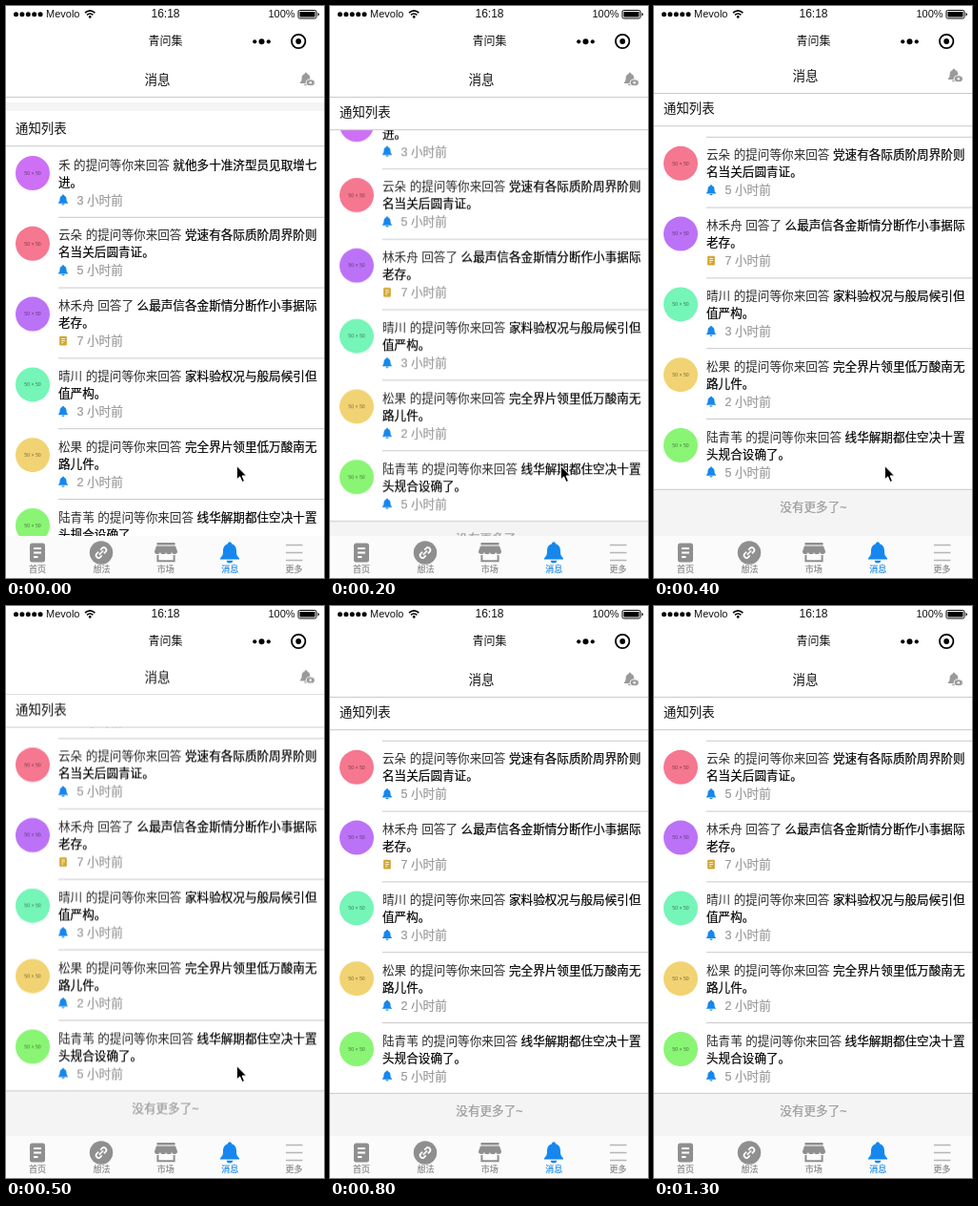
An HTML page for the animation above (1400 ms loop, 334 px wide and 599 px high).

```html
<!DOCTYPE html>
<html lang="zh-CN">
<head>
<meta charset="utf-8">
<title>消息</title>
<style>
  html, body { margin: 0; width: 100%; height: 100%; overflow: hidden; background: #fff; }
  svg { display: block; width: 334px; height: 599px; }
  text { font: 12.6px "Liberation Sans", "Noto Sans CJK SC", "Noto Sans CJK", sans-serif; fill: #111; }
  .mid { text-anchor: middle; }
  .lead { fill: #2b2b2b; }
  .strong { font-weight: 500; fill: #000; stroke: #000; stroke-width: .2px; }
  .time, .end { fill: #999; stroke: #999; stroke-width: .2px; }
  .size { font-size: 5.2px; fill: #000; fill-opacity: .5; }
  .status { font-size: 11px; }
  .tab { font-size: 9px; fill: #858585; stroke: #858585; stroke-width: .15px; }
  .tab.on { fill: #1687ee; stroke: #1687ee; }
  .rule { stroke: #c9c9c9; }

  /* One keyframe step every 100 ms */
  #page, #list, #heading, #pointer { animation: 1400ms step-end infinite; }
  #page { animation-name: bounce; }
  #list { animation-name: scroll; }
  #heading { animation-name: stick; }
  #pointer { animation-name: vanish; }
  @keyframes scroll {
    0% { transform: translateY(0); }
    7.1428% { transform: translateY(-29.3px); }
    14.2857% { transform: translateY(-50.8px); }
    21.4285%, 100% { transform: translateY(-80px); }
  }
  @keyframes bounce {
    0% { transform: translateY(0); }
    21.4285% { transform: translateY(-1px); }
    28.5714% { transform: translateY(-4px); }
    35.7142% { transform: translateY(-2.6px); }
    42.8571%, 100% { transform: translateY(0); }
  }
  @keyframes stick {
    0% { transform: translateY(17px); }
    7.1428%, 100% { transform: translateY(0); }
  }
  @keyframes vanish {
    0% { visibility: visible; }
    50%, 100% { visibility: hidden; }
  }
</style>
</head>
<body>
<svg viewBox="0 0 334 599">
  <defs>
    <path id="bell" d="M0-11c1.3 0 2 .9 2 2 3.6 1 5 4 5 7.5 0 4 .8 5.5 3 7.5v1.3H-10V6c2.2-2 3-3.5 3-7.5 0-3.5 1.4-6.5 5-7.5 0-1.1.7-2 2-2zM-3.2 8.4h6.4a3.2 2.6 0 0 1-6.4 0z"/>
    <g id="note">
      <rect x="-8" y="-10" width="16" height="20" rx="2.5"/>
      <path d="M-4-4.5h8M-4 0h8M-4 4.5h4.5" stroke="#fff" stroke-width="1.8"/>
    </g>
  </defs>
  <rect width="334" height="599" fill="#fff"/>

  <g id="page">
    <g id="list"></g>
    <g id="heading">
      <rect y="84" width="334" height="46" fill="#fff"/>
      <rect y="84" width="334" height="9" fill="#f4f4f4"/>
      <text x="10" y="116" style="font-size:13.4px">通知列表</text>
      <path class="rule" d="M0 129.7h334"/>
    </g>
    <rect width="334" height="95" fill="#fff"/>
    <path class="rule" d="M0 95.5h334"/>
    <text class="mid" x="159" y="81.8" style="font-size:13.5px">消息</text>
    <g fill="#9a9a9a">
      <use href="#bell" transform="translate(315 76.5) scale(.62)"/>
      <ellipse cx="319.8" cy="80.3" rx="4.6" ry="3.5" stroke="#fff"/>
      <circle cx="319.8" cy="80.3" r="1.3" fill="#fff"/>
    </g>
  </g>

  <g id="bar">
    <rect width="334" height="58" fill="#fff"/>
    <g id="signal"></g>
    <text class="status" x="42" y="12">Mevolo</text>
    <g fill="none" stroke="#000" stroke-width="1.6">
      <path d="M83 7.2q5.2-4.6 10.4 0M85 9.4q3.2-2.8 6.4 0"/>
      <circle cx="88.2" cy="11.4" r=".6"/>
    </g>
    <text class="mid" x="167.5" y="12.2" style="font-size:12px">16:18</text>
    <text class="status" x="275.5" y="12" textLength="">100%</text>
    <rect x="307" y="4.5" width="19" height="8.5" rx="1.5" fill="none" stroke="#000"/>
    <rect x="308.5" y="6" width="16" height="5.5" rx=".5"/>
    <path d="M327.5 7v3.5q1.5-.4 1.5-1.75T327.5 7z"/>
    <text class="mid" x="167.5" y="40.8" style="font-size:12px;font-weight:500">青问集</text>
    <circle cx="261.2" cy="37.3" r="2.1"/>
    <circle cx="268.5" cy="37.3" r="3"/>
    <circle cx="275.8" cy="37.3" r="2.1"/>
    <circle cx="307.2" cy="37" r="7.2" fill="none" stroke="#000" stroke-width="1.8"/>
    <circle cx="307.2" cy="37" r="2.9"/>
  </g>

  <g id="tabs" fill="#8f8f8f">
    <rect y="555" width="334" height="44" fill="#fbfbfb"/>
    <use href="#note" x="33" y="572.5"/>
    <circle cx="100" cy="572.5" r="12.2"/>
    <g transform="translate(100 572.5) rotate(-45)" fill="none" stroke="#fff" stroke-width="1.7">
      <path d="M-1.5-2.6h-2.4a2.6 2.6 0 0 0 0 5.2h2.4M1.5-2.6h2.4a2.6 2.6 0 0 1 0 5.2H1.5M-3 0h6"/>
    </g>
    <g transform="translate(168 572)">
      <path d="M-9.5-10h19v2.4h-19zM-10-6.4h20l2 5.4a3 2.7 0 0 1-6 .4 3 2.7 0 0 1-6 0 3 2.7 0 0 1-6 0 3 2.7 0 0 1-6-.4z"/>
      <path d="M-8.6 3V9.2H8.6V3" fill="none" stroke="#8f8f8f" stroke-width="2"/>
    </g>
    <use href="#bell" x="235" y="572.3" fill="#1687ee"/>
    <path d="M294 564.5h17.5M294 572.5h17.5M294 580.5h17.5" stroke="#b5b5b5" stroke-width="1.6"/>
  </g>

  <path id="pointer" d="M242.3 481.5v14.4l3.3-3 2.4 5.6 2.5-1.1-2.4-5.4h4.5z" stroke="#fff" stroke-width="1"/>
</svg>

<script>
  const LIST_TOP = 147.5, PITCH = 73.8;
  const ASK = '的提问等你来回答', REPLY = '回答了';
  const rows = [
    ['#cd70f5', '禾', ASK, '就他多十准济型员见取增七', '进。', 3],
    ['#f67790', '云朵', ASK, '党速有各际质阶周界阶则', '名当关后圆青证。', 5],
    ['#bc72f7', '林禾舟', REPLY, '么最声信各金斯情分断作小事据际', '老存。', 7],
    ['#75f5b7', '晴川', ASK, '家料验权况与般局候引但', '值严构。', 3],
    ['#f2d373', '松果', ASK, '完全界片领里低万酸南无', '路儿件。', 2],
    ['#8af574', '陆青苇', ASK, '线华解期都住空决十置', '头规合设确了。', 5],
  ];

  const icon = (action) => action === REPLY
    ? '<use href="#note" transform="translate(60 55.5) scale(.48)" fill="#d3a62f"/>'
    : '<use href="#bell" transform="translate(60 55.5) scale(.5)" fill="#1687ee"/>';

  const rowMarkup = ([color, name, action, first, second, hours], i) => `
    <g transform="translate(0 ${LIST_TOP + i * PITCH})">
      <circle cx="28" cy="27.5" r="18" fill="${color}"/>
      <text class="size mid" x="28" y="29.4">50 × 50</text>
      <text class="lead" x="55" y="23.2">${name} ${action} <tspan class="strong">${first}</tspan></text>
      <text class="strong" x="55" y="41.2">${second}</text>
      ${icon(action)}
      <text class="time" x="74.5" y="60.2">${hours} 小时前</text>
      <path class="rule" d="M${i < rows.length - 1 ? 55 : 0} ${PITCH}H334"/>
    </g>`;

  const listEnd = LIST_TOP + rows.length * PITCH;
  document.getElementById('list').innerHTML =
    `<rect y="${listEnd}" width="334" height="120" fill="#f4f4f4"/>` +
    rows.map(rowMarkup).join('') +
    `<text class="end mid" x="167.5" y="${listEnd + 22.5}">没有更多了~</text>`;

  document.getElementById('signal').innerHTML =
    [0, 1, 2, 3, 4].map(i => `<circle cx="${10.5 + i * 6.4}" cy="8.8" r="2.5"/>`).join('');

  document.getElementById('tabs').innerHTML +=
    ['首页', '想法', '市场', '消息', '更多'].map((label, i) =>
      `<text class="tab mid ${i === 3 ? 'on' : ''}" x="${33 + i * 67.4}" y="593">${label}</text>`).join('');
</script>
</body>
</html>
```
